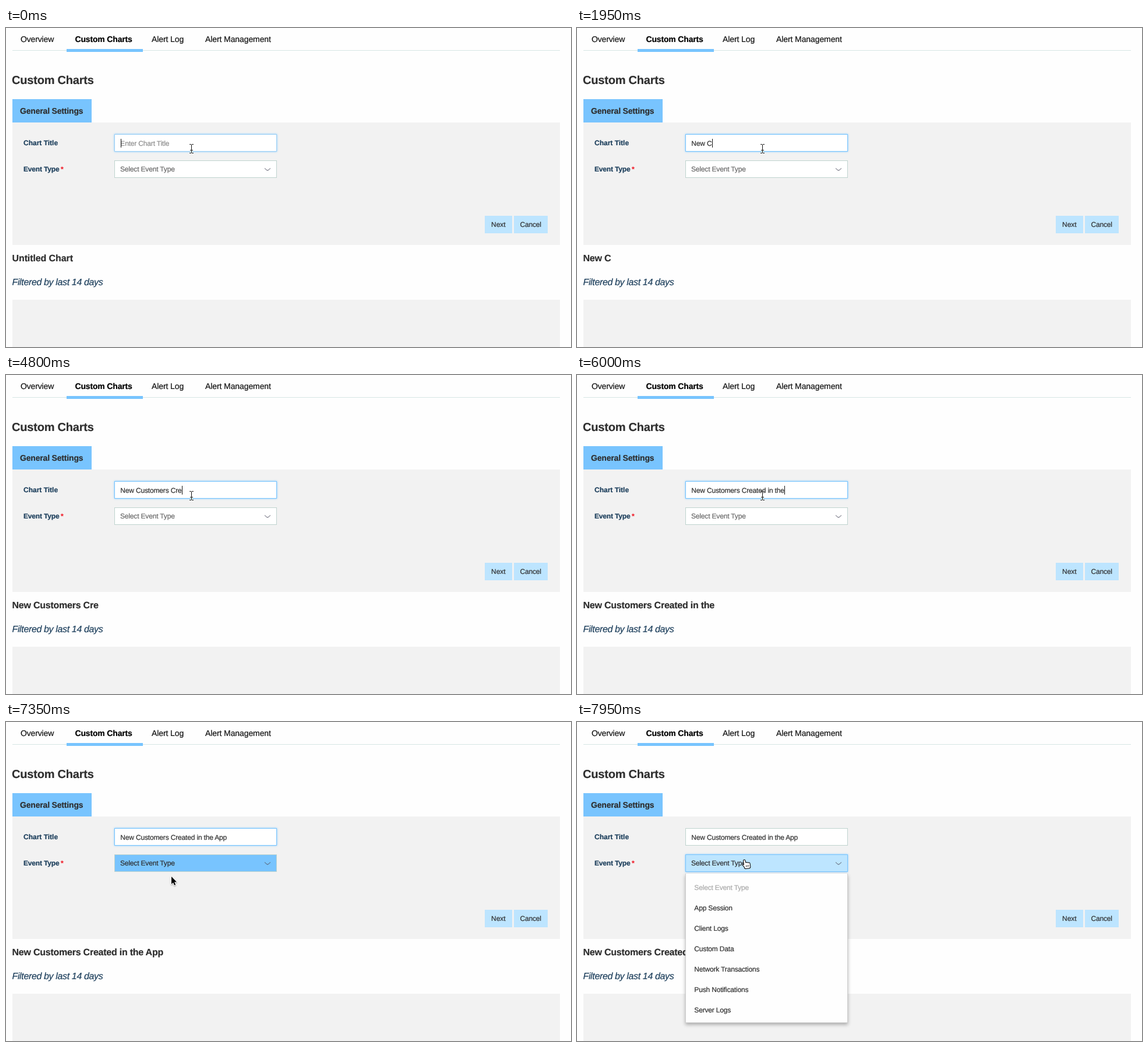
An HTML page with a canvas that plays this animation: 970x547 px, repeating every 8 s.

```html
<!DOCTYPE html>
<html lang="en">
<head>
<meta charset="utf-8">
<title>Custom Charts</title>
<style>
  html, body { margin: 0; width: 100%; height: 100%; overflow: hidden; background: #fefefe; }
  canvas { display: block; width: 970px; height: 547px; }
</style>
</head>
<body>
<canvas id="stage" width="970" height="547"></canvas>
<script>
const ctx = document.getElementById('stage').getContext('2d');
const LOOP = 8000, STEP = 150, BLINK = 450;
const FOCUS = 150, HOVER = 7200, OPEN = 7800;
const BLUE = '#78c4fe', PALE = '#bde5ff', GREY = '#f2f2f2', EDGE = '#bfd3ce';
const INK = '#2e2e2e', NAVY = '#1d3f5c';
const EVENTS = ['Select Event Type', 'App Session', 'Client Logs', 'Custom Data',
  'Network Transactions', 'Push Notifications', 'Server Logs'];

// Typing bursts: start, number of steps, title when done
const bursts = [
  [900, 2, 'Ne'], [1500, 2, 'New '], [1950, 1, 'New C'],
  [2250, 6, 'New Customerse '], [4050, 2, 'New Customers'], [4350, 1, 'New Customers '],
  [4650, 4, 'New Customers Create'], [5400, 7, 'New Customers Created in the A'],
  [6450, 2, 'New Customers Created in the App'],
];
const pointer = [[0, ibeam, 318, 199], [7050, arrow, 300, 160], [HOVER, hand, 282, 236],
  [7350, arrow, 283, 264], [7500, hand, 282, 236]];

// Title at time t, and the time of the last keystroke
function typed(t) {
  let title = '', last = FOCUS;
  for (const [start, steps, goal] of bursts) {
    if (t < start) break;
    const done = Math.min(steps, Math.floor((t - start) / STEP) + 1);
    const longer = goal.length > title.length ? goal : title;
    const added = Math.ceil((goal.length - title.length) * done / steps);
    title = longer.slice(0, title.length + added);
    last = start + (done - 1) * STEP;
  }
  return { title, last };
}

function rect(x, y, w, h, color) {
  ctx.fillStyle = color;
  ctx.fillRect(x, y, w, h);
}

function setFont(size, style, gap) {
  ctx.font = `${style} ${size}px "Liberation Sans", Arial, sans-serif`;
  ctx.letterSpacing = gap + 'px';
}

function text(str, x, y, { size = 12, style = '', gap = -0.165, color = INK } = {}) {
  setFont(size, style, gap);
  ctx.fillStyle = ctx.strokeStyle = color;
  ctx.lineWidth = 0.2;
  ctx.fillText(str, x, y);
  ctx.strokeText(str, x, y);
}

function field(y, fill, border, glow) {
  ctx.save();
  if (glow) {
    ctx.shadowColor = BLUE;
    ctx.shadowBlur = 3;
  }
  rect(186, y, 279, 30, border);
  ctx.restore();
  rect(187, y + 1, 277, 28, fill);
}

function ibeam() {
  rect(-1, 1, 3, 14, 'rgba(255,255,255,.6)');
  rect(0, 1, 1, 14, '#111');
  rect(-2, 10, 5, 1, '#222');
  for (const y of [0, 15]) {
    rect(-3, y, 3, 1, '#222');
    rect(1, y, 3, 1, '#222');
  }
}

function arrow() {
  const path = new Path2D('M1 1V14L4 11.2L6.2 16L8.2 15.1L6.1 10.4L10 10.2Z');
  ctx.shadowColor = 'rgba(0,0,0,.35)';
  ctx.shadowBlur = 2;
  ctx.shadowOffsetY = 1;
  ctx.lineJoin = 'round';
  ctx.lineWidth = 2;
  ctx.strokeStyle = '#fff';
  ctx.stroke(path);
  ctx.shadowColor = 'transparent';
  ctx.fillStyle = '#000';
  ctx.fill(path);
}

// Index finger, three knuckles, palm and thumb merged into one outline
function hand() {
  const path = new Path2D();
  ctx.rotate(-0.15);
  path.roundRect(3.6, 1.6, 2.6, 11, 1.3);
  for (let i = 1; i < 4; i++) path.roundRect(3.6 + 2.4 * i, 5.6 + 0.6 * i, 2.6, 6, 1.3);
  path.roundRect(3.6, 9, 9.8, 7.2, 2.5);
  path.moveTo(1.2, 9.6);
  path.lineTo(2.6, 9.2);
  path.lineTo(6, 12);
  path.lineTo(5, 15);
  path.closePath();
  ctx.lineJoin = 'round';
  ctx.lineWidth = 2;
  ctx.strokeStyle = '#000';
  ctx.stroke(path);
  ctx.fillStyle = '#fff';
  ctx.fill(path);
  for (let i = 0; i < 3; i++) rect(6.4 + 2.2 * i, 10.8, 0.8, 3.2, '#222');
}

function chevron() {
  ctx.lineWidth = 1;
  ctx.strokeStyle = '#556';
  ctx.stroke(new Path2D('M444 240.5Q447 243.5 449 244.5Q451 243.5 454 240.5'));
}

function page() {
  rect(0, 0, 970, 547, '#fefefe');
  rect(11, 38, 940, 1, '#d6e6e4');
  rect(104, 36, 131, 5, BLUE);
  const nav = { size: 14, gap: -0.1, color: '#111' };
  text('Overview', 25, 24, { ...nav, gap: -0.15 });
  text('Custom Charts', 118.5, 24, { ...nav, style: 'bold', gap: -0.17, color: '#000' });
  text('Alert Log', 250, 24, nav);
  text('Alert Management', 342, 24, nav);
  text('Custom Charts', 10, 96, { size: 20, style: 'bold', gap: -0.2 });
  rect(11, 122, 136, 40, BLUE);
  rect(11, 162, 940, 210, GREY);
  rect(11, 466, 940, 81, GREY);
  text('General Settings', 24, 147, { size: 14, style: 'bold', gap: -0.18 });
  const label = { style: 'bold', color: NAVY };
  text('Chart Title', 30, 201, { ...label, gap: 0 });
  text('Event Type', 30, 246, label);
  text('*', 94, 246, { style: 'bold', color: '#f0202c' });
  rect(822, 322, 47, 30, PALE);
  rect(872, 322, 58, 30, PALE);
  text('Next', 833, 341, { gap: 0 });
  text('Cancel', 882.5, 341);
  text('Filtered by last 14 days', 10.5, 441, { size: 16, style: 'italic', gap: -0.36, color: NAVY });
}

function spellMark() {
  ctx.save();
  ctx.setLineDash([2, 1.4]);
  ctx.lineWidth = 2;
  ctx.strokeStyle = '#f0604c';
  ctx.stroke(new Path2D('M223 204H286'));
  ctx.restore();
}

function titleInput(t, title, last) {
  const focused = t < OPEN;
  field(182, '#fff', !focused ? EDGE : t < FOCUS ? '#9ccff5' : BLUE, focused);
  if (title) text(title, 196.3, 202);
  else text('Enter Chart Title', 196.3, 202, { color: '#8c8c8c' });
  if (t >= 3000 && title.includes('Customerse')) spellMark();

  const lit = Math.floor(Math.max(0, t - last) / BLINK) % 2 === 0;
  if (focused && lit) {
    setFont(12, '', -0.165);
    rect(Math.round(196.7 + ctx.measureText(title).width), 190, 1, 15, '#111');
  }
}

function eventSelect(t) {
  const open = t >= OPEN, hover = t >= HOVER;
  field(227, open ? PALE : hover ? BLUE : '#fff', open ? BLUE : EDGE, open);
  text(EVENTS[0], 196, 246, { color: hover ? INK : '#686868' });
  chevron();
}

function menu(alpha) {
  ctx.save();
  ctx.globalAlpha = alpha;
  ctx.shadowColor = 'rgba(0,0,0,.3)';
  ctx.shadowBlur = 6;
  ctx.shadowOffsetY = 3;
  rect(186, 260, 279, 256, '#cfcfcf');
  ctx.shadowColor = 'transparent';
  rect(187, 260, 277, 255, '#fefefe');
  EVENTS.forEach((name, i) => text(name, 201.3, 288 + i * 35, { color: i ? INK : '#a9a9a9' }));
  ctx.restore();
}

function draw(t) {
  const { title, last } = typed(t);
  page();
  text(title || 'Untitled Chart', 10.5, 400,
    { size: 16, style: 'bold', gap: title ? -0.235 : -0.1 });
  titleInput(t, title, last);
  eventSelect(t);
  if (t >= OPEN) menu(t < OPEN + STEP ? 0.6 : 1);

  const [, cursor, x, y] = pointer.findLast(p => p[0] <= t);
  ctx.save();
  ctx.translate(x, y);
  cursor();
  ctx.restore();
}

ctx.textRendering = 'geometricPrecision';
const start = performance.now();
function tick() {
  draw((performance.now() - start) % LOOP);
  requestAnimationFrame(tick);
}
tick();
</script>
</body>
</html>
```
